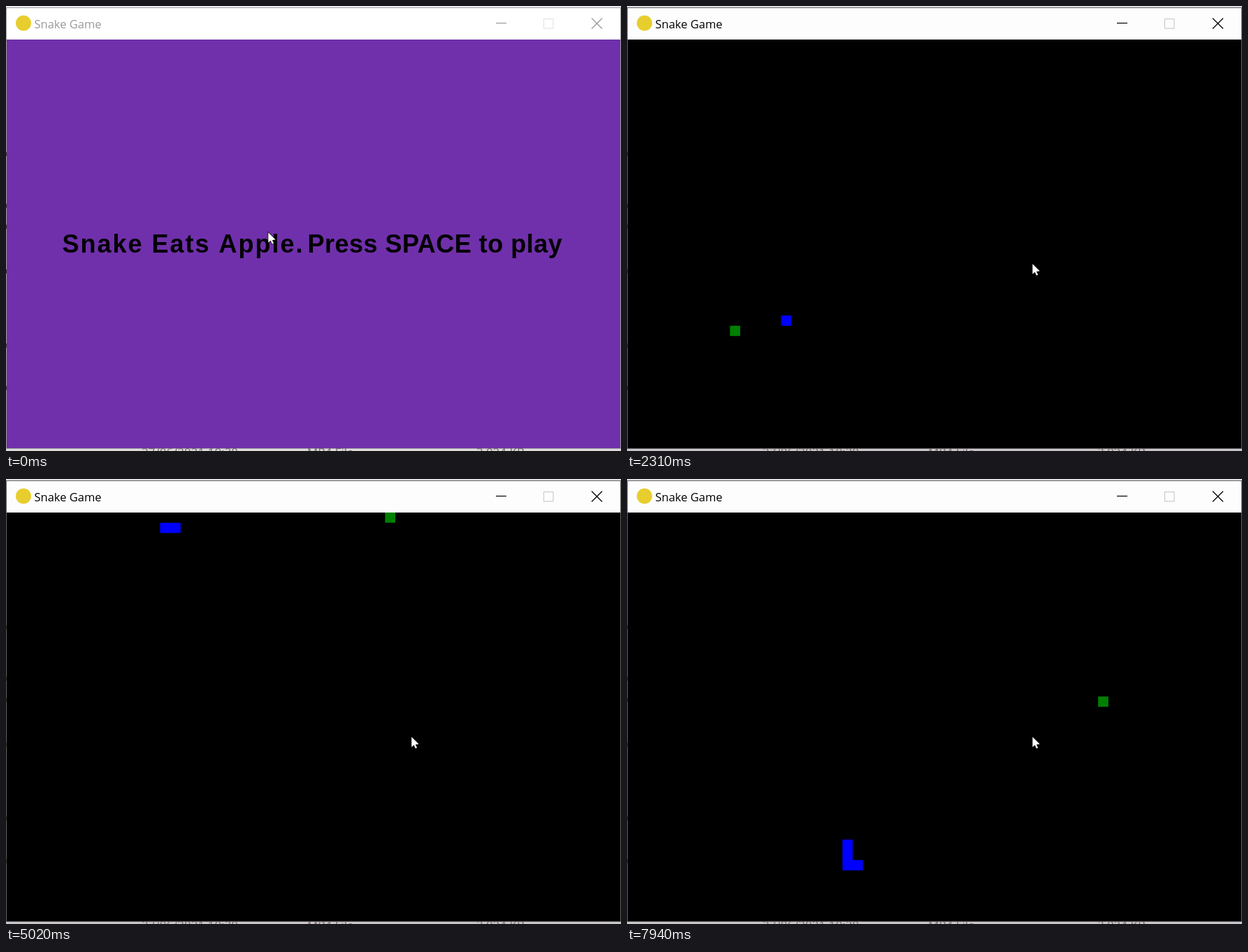
An HTML page with a canvas that plays this animation: 880x637 px, repeating every 7.99 s.

```html
<!DOCTYPE html>
<html lang="en">
<head>
<meta charset="utf-8">
<title>Snake Game</title>
<style>
  html, body { margin: 0; width: 100%; height: 100%; overflow: hidden; }
  canvas { display: block; }
</style>
</head>
<body>
<canvas id="stage" width="880" height="637"></canvas>
<script>
const ctx = document.getElementById('stage').getContext('2d');
const LOOP = 7990, INTRO = 500;
const CELL = 878 / 60, LEFT = 1, TOP = 48;
const FIRST_MOVE = 870, CLOCK_START = 773, MOVE_TIME = 36;
const UI_FONT = '"Open Sans", "Noto Sans", sans-serif';

// Corners of the snake's route and the apples, in cells
const corners = [[8, 0], [8, 27], [30, 27], [30, 28], [7, 28], [7, 1],
  [25, 1], [25, 0], [41, 0], [41, 34], [21, 34], [21, 32]];
const apples = [[10, 28], [37, 0], [21, 34], [46, 18]];

const route = [[0, 0]];
for (const [cx, cy] of corners) {
  let [x, y] = route[route.length - 1];
  while (x !== cx || y !== cy) {
    x += Math.sign(cx - x);
    y += Math.sign(cy - y);
    route.push([x, y]);
  }
}

// The move at which each apple is eaten
const meals = apples.map(apple => route.findIndex(cell => `${cell}` === `${apple}`))
  .filter(move => move >= 0);

function rect(color, x, y, w, h) {
  ctx.fillStyle = color;
  ctx.fillRect(x, y, w, h);
}

function text(str, x, y, font, color, spacing = 0) {
  ctx.font = font;
  ctx.fillStyle = color;
  ctx.letterSpacing = spacing + 'px';
  ctx.fillText(str, x, y);
}

function line(color, x1, y1, x2, y2) {
  ctx.strokeStyle = color;
  ctx.lineWidth = 1.2;
  ctx.beginPath();
  ctx.moveTo(x1, y1);
  ctx.lineTo(x2, y2);
  ctx.stroke();
}

function cells(list, color) {
  ctx.beginPath();
  for (const [col, row] of list) ctx.rect(LEFT + col * CELL, TOP + row * CELL, CELL, CELL);
  ctx.fillStyle = color;
  ctx.fill();
}

function drawWindow(active) {
  const ink = active ? '#000' : '#999';
  rect(active ? '#e2dde1' : '#eeebee', 0, 0, 880, 637);
  rect(active ? '#626262' : '#a0a0a0', 0, 2, 880, 632);

  // Slivers of the file list behind the window
  rect(active ? '#c9c5c8' : '#dedbde', 0, 634, 880, 3);
  text('27/06/2021 10:20', 194, 645, '17px ' + UI_FONT, '#75676d');
  text('MP4 File', 431, 645, '17px ' + UI_FONT, '#75676d');
  text('3,024 KB', 673, 645, '17px ' + UI_FONT, '#75676d');
  for (const y of [212, 286, 316, 380, 486, 547]) rect('#432', 0, y - 3, 1, 6);

  rect(active ? '#fdfdfd' : '#fff', 1, 3, 878, 45);
  ctx.fillStyle = '#e8cd2e';
  ctx.beginPath();
  ctx.arc(25, 24.5, 11, 0, 7);
  ctx.fill();
  text('Snake Game', 40.5, 32, '16.5px ' + UI_FONT, ink);

  line(ink, 701, 24.5, 716, 24.5);
  ctx.strokeStyle = active ? '#ccc' : '#e4e4e4';
  ctx.strokeRect(769.5, 18.5, 13.5, 13.5);
  line(ink, 838, 17.5, 853, 32.5);
  line(ink, 853, 17.5, 838, 32.5);
}

function drawIntro() {
  const font = 'bold 36px "Liberation Sans", Arial, sans-serif';
  rect('#7030ab', LEFT, TOP, 878, 585);
  text('Snake Eats Apple.', 80.4, 352.5, font, '#000', 2);
  text('Press SPACE to play', 431.4, 352.5, font, '#000', 0.5);
}

function drawGame(t) {
  const moves = t < FIRST_MOVE ? 0 : Math.floor((t - CLOCK_START) / MOVE_TIME);
  const head = Math.min(moves, route.length - 1);
  const eaten = meals.filter(move => move <= head).length;
  rect('#000', LEFT, TOP, 878, 585);
  cells([apples[eaten]], '#008000');
  cells(route.slice(Math.max(0, head - eaten), head + 1), '#00f');
}

function drawPointer(x, y) {
  const arrow = new Path2D('M0 0V14.5L3.3 11.5L5.6 16.5L7.8 15.4L5.6 10.7L10.3 10.3Z');
  ctx.save();
  ctx.translate(x, y);
  ctx.strokeStyle = '#000';
  ctx.lineWidth = 1.4;
  ctx.stroke(arrow);
  ctx.fillStyle = '#fff';
  ctx.fill(arrow);
  ctx.restore();
}

function draw(t) {
  const active = t >= INTRO;
  drawWindow(active);
  if (active) {
    drawGame(t);
    drawPointer(580.3, 369.3);
  } else {
    drawIntro();
    drawPointer(375.3, 324.3);
  }
}

let begin;
function tick(now) {
  begin ??= now;
  draw((now - begin) % LOOP);
  requestAnimationFrame(tick);
}
draw(0);
requestAnimationFrame(tick);
</script>
</body>
</html>
```
